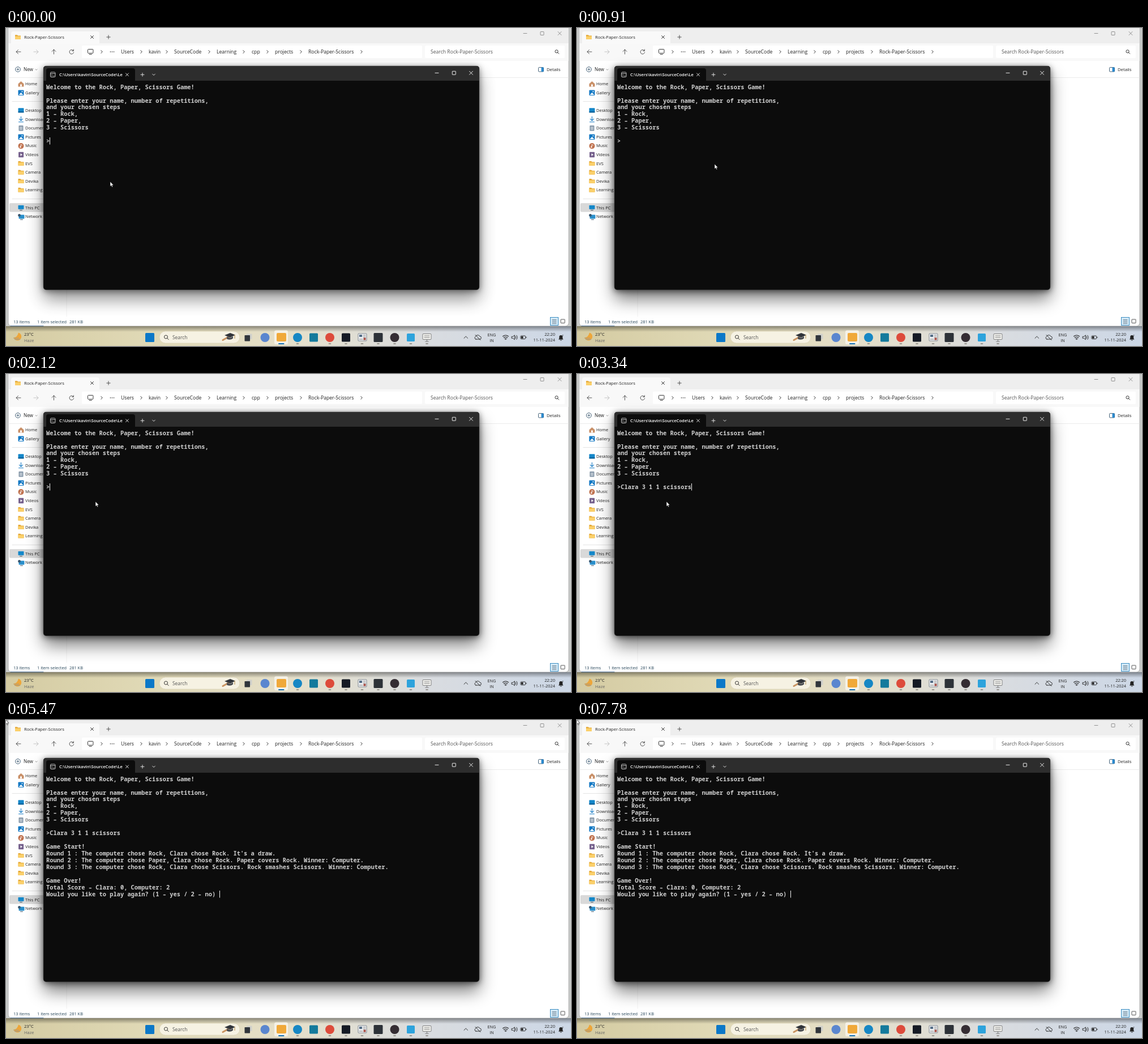
Animation, 998 px wide and 561 px high, one loop 8000 ms. Source, as an HTML page:

```html
<!DOCTYPE html>
<html lang="en">
<head>
<meta charset="utf-8">
<title>Console game</title>
<style>
  html, body { margin: 0; width: 100%; height: 100%; overflow: hidden; background: #c9cbca; }
  svg { display: block; width: 998px; height: 561px; font-family: "Open Sans", "Noto Sans", sans-serif; }
  .console { font: 600 10.4px "Noto Sans Mono", "DejaVu Sans Mono", monospace; fill: #cfcfcf; white-space: pre; }
  .ambient { filter: blur(6px); opacity: .6; }
  .drop { filter: blur(15px); opacity: .5; }
</style>
</head>
<body>
<svg id="stage" viewBox="0 0 998 561" xmlns="http://www.w3.org/2000/svg"></svg>
<script>
const INK = '#222', YELLOW = '#fbd06a', BLUE = '#1479c4';

// Shape helpers; every one returns SVG markup.
const rect = (x, y, w, h, fill, r = 0, extra = '') =>
  `<rect x="${x}" y="${y}" width="${w}" height="${h}" rx="${r}" fill="${fill}" ${extra}/>`;
const frame = (x, y, w, h, color, r = 0, width = .9) =>
  rect(x, y, w, h, 'none', r, `stroke="${color}" stroke-width="${width}"`);
const disc = (x, y, r, fill) => `<circle cx="${x}" cy="${y}" r="${r}" fill="${fill}"/>`;
const ring = (x, y, r, color = INK, width = .9) =>
  `<circle cx="${x}" cy="${y}" r="${r}" fill="none" stroke="${color}" stroke-width="${width}"/>`;
const line = (d, color = INK, width = .9) =>
  `<path d="${d}" fill="none" stroke="${color}" stroke-width="${width}" stroke-linecap="round" stroke-linejoin="round"/>`;
const fill = (d, color) => `<path d="${d}" fill="${color}"/>`;
const text = (x, midY, s, size = 7.5, color = INK, extra = '') =>
  `<text x="${x}" y="${midY + size * .36}" font-size="${size}" fill="${color}" ${extra}>${s}</text>`;

const cross = (x, y, r, color) => line(`M${x - r} ${y - r}l${2 * r} ${2 * r}m0 ${-2 * r}l${-2 * r} ${2 * r}`, color);
const plus = (x, y, r, color) => line(`M${x - r} ${y}h${2 * r}M${x} ${y - r}v${2 * r}`, color);
const chevronRight = (x, y) => line(`M${x - 1.2} ${y - 2.5}l2.5 2.5l-2.5 2.5`);
const chevronDown = (x, y, r, color) => line(`M${x - r} ${y - r / 2}l${r} ${r}l${r} ${-r}`, color);
const magnifier = (x, y, r = 2.6) => ring(x, y, r) + line(`M${x + r * .7} ${y + r * .7}l${r * .9} ${r * .9}`);
const folder = (x, y) =>
  fill(`M${x} ${y + .6}h3.8l1.4 1.3h4.8v6.6h-10z`, '#e3a735') + rect(x, y + 2.9, 10, 5.6, YELLOW, .6);
const screen = (x, y, color) =>
  rect(x, y, 10, 7, color, .8) + line(`M${x + 3} ${y + 8.6}h4`, '#456', 1);
const picture = (x, y) =>
  rect(x, y, 10, 9.6, BLUE, 1) + fill(`M${x + 1} ${y + 8.6}l4-4l4 4z`, '#fff') + disc(x + 7, y + 2.8, 1, '#fff');
const gradient = (id, stops, direction = '') =>
  `<linearGradient id="${id}" ${direction}>${
    stops.map((c, i) => `<stop offset="${i / (stops.length - 1)}" stop-color="${c}"/>`).join('')
  }</linearGradient>`;

function windowButtons(xs, y, color) {
  const [min, max, close] = xs;
  return line(`M${min - 3} ${y}h6`, color) + frame(max - 3, y - 3, 6, 6, color, .5) + cross(close, y, 3, color);
}

function sidebar() {
  const items = [
    ['Home', (x, y) => fill(`M${x} ${y + 4.5}l5-4.5l5 4.5v5h-10z`, '#c99068') + rect(x + 3.6, y + 5.5, 2.8, 4, '#fff')],
    ['Gallery', picture],
    null,
    ['Desktop', (x, y) => rect(x, y + .6, 10, 8, '#1487c9', .8) + rect(x, y + 6.6, 10, 2, '#0b5d95', .6)],
    ['Downloads', (x, y) => line(`M${x + 5} ${y}v7m-3-3l3 3l3-3M${x + 1} ${y + 9.4}h8`, BLUE, 1.1)],
    ['Documents', (x, y) => rect(x + 1, y, 8, 9.6, '#8496a8', .8) + line(`M${x + 3} ${y + 3}h4m-4 2h4m-4 2h4`, '#fff', .8)],
    ['Pictures', picture],
    ['Music', (x, y) => disc(x + 5, y + 5, 5, '#c07350') + line(`M${x + 4.5} ${y + 6.6}v-4l2.5 1`, '#fff', .9) + disc(x + 3.9, y + 6.8, 1.2, '#fff')],
    ['Videos', (x, y) => rect(x + .6, y, 9, 9.6, '#75608c', .8) + fill(`M${x + 4} ${y + 2.6}l3.5 2.2l-3.5 2.2z`, '#fff')],
    ['EVS', folder], ['Camera', folder], ['Devika', folder], ['Learning', folder],
    null,
    ['This PC', (x, y) => screen(x, y + .5, '#1487c9')],
    ['Network', (x, y) => screen(x + 1, y + 1.5, '#2a8fcb') + disc(x + 2, y + 2.5, 2.4, '#37566e')],
  ];
  return rect(6, 309, 62, 15.5, '#d9d9d9', 2) +
    line('M11 129.5H68M11 301.5H68', '#dedede', .8) +
    items.map((item, i) => {
      if (!item) return '';
      const y = 98.5 + 15.6 * i;
      return item[1](21.5, y - 4.6) + text(34, y, item[0]);
    }).join('');
}

function explorer() {
  const crumbs = [[203, 'Users'], [252, 'kavin'], [297, 'SourceCode'], [372, 'Learning'],
    [434, 'cpp'], [475, 'projects'], [534, 'Rock-Paper-Scissors']];
  return rect(4, -8, 990, 534, '#fff', 6, 'stroke="#a0a0a0" stroke-width=".8"') +
    rect(4.4, 0, 989.2, 28, '#eeeeee') + rect(4.4, 27, 989.2, 31, '#f8f8f8') +
    fill('M9 28V10q0-4 4-4H161q4 0 4 4V28z', '#f9f9f9') +
    folder(16, 11.6) + text(32, 16, 'Rock-Paper-Scissors', 7.6) +
    cross(152, 16, 2.5, INK) + plus(181, 16, 3.2, '#444') +
    windowButtons([917, 947, 978], 9.5, '#888') +
    rect(134, 31, 601, 22, '#fff', 2) + rect(740, 31, 247, 22, '#fff', 2) +
    line('M26 42h-8m3.5-3.5l-3.5 3.5l3.5 3.5', '#444') +
    line('M49 42h8m-3.5-3.5l3.5 3.5l-3.5 3.5', '#bbb') +
    line('M84.5 46v-8m-3.5 3.5l3.5-3.5l3.5 3.5', '#444') +
    line('M119 40a3.8 3.8 0 1 0 .6 3M119.3 37.8v2.6h-2.6', '#444') +
    frame(144.5, 37.5, 9.4, 7, INK, 1) + line('M147 46.6h4.4') +
    [184.5, 187.5, 190.5].map(x => disc(x, 42, .8, INK)).join('') +
    [169, 239, 284, 359, 420, 462, 521, 628].map(x => chevronRight(x, 42)).join('') +
    crumbs.map(([x, s]) => text(x, 42, s, 8.65)).join('') +
    text(750, 42, 'Search Rock-Paper-Scissors', 8.65, '#555') + magnifier(972.5, 41.3) +
    ring(21, 73, 4.4, '#34536b') + plus(21, 73, 2, '#34536b') +
    text(31, 73.5, 'New', 8.2) + chevronDown(53.5, 73.5, 1.5, '#888') +
    frame(940.5, 69.5, 9, 7.5, '#34536b', 1) + rect(945.5, 69.5, 4, 7.5, '#2a8ad0', .6) +
    text(955, 73.5, 'Details', 7.7) +
    line('M4.5 87.5H993.5', '#e6e6e6', .8) + line('M107 88V509', '#f0f0f0', .8) +
    sidebar() +
    text(13, 518, '13 items', 7.4, '#27465a') + text(55, 518, '1 item selected', 7.4, '#27465a') +
    text(112, 518, '281 KB', 7.4, '#27465a') +
    rect(961.5, 510.5, 14, 14, '#d5ebf8', 0, 'stroke="#2b84bd" stroke-width=".9"') +
    line('M965 514.5h7m-7 2.3h7m-7 2.3h7m-7 2.3h7', '#456', .7) +
    frame(980, 514, 7, 6.5, '#444', .5);
}

function taskbar() {
  const squares = [[254, 16, '#0b78c8'], [543.5, 15, '#147a9c'], [600.5, 15, '#151a24'],
    [657.5, 16, '#2d3238'], [715, 14, '#2ea3dc']];
  const discs = [[457.5, 8, '#5a86cf'], [515, 8, '#1687c4'], [572, 8, '#dd4b3b'], [686.5, 8, '#352d33']];
  return gradient('bar', ['#d4cba2', '#e0d9b6', '#e5dfc9', '#d9dce0', '#ccd7e6']) +
    gradient('windowShade', ['#0006', '#0000'], 'x1="0" y1="0" x2="0" y2="1"') +
    rect(0, 526, 998, 35, 'url(#bar)') + rect(0, 526, 998, 10, 'url(#windowShade)') +
    line('M8 525.7H66', '#3f668f', 1) +
    fill('M22 537.5a7 7 0 1 1-8.5 8.5q6 .5 8.5-8.5z', '#eda63a') +
    line('M13.5 547h9m-7 2.4h9', '#a89c86', 1.2) +
    text(32, 540.3, '23°C', 7.6) + text(32, 551, 'Haze', 7.5, '#666') +
    rect(271, 535, 142, 21, '#f6f2e3', 10.5, 'stroke="#d8d0b2" stroke-width=".7"') +
    magnifier(282.5, 545, 3) + text(294, 546, 'Search', 8.4, '#555') +
    line('M383 550.5l10-5.5', '#c99361', 3) +
    fill('M386 542l10-4l9 3.5l-9 4.5z', '#30343a') + fill('M390 544.5v4q6 3 11-1v-3.5l-5 2.5z', '#4a4d52') +
    line('M404 541.5v6', '#b18a4a', 1) +
    rect(425, 539.5, 9.5, 9.5, '#d0d0cb', .8) + rect(421.5, 542, 9.5, 10.5, '#30353b', .8) +
    rect(474, 533.5, 24, 24.5, '#f5f1e6', 3) + rect(478, 538, 17, 15, '#f0a93a', 2) +
    rect(481, 556, 10.5, 2, '#1070b8', 1) +
    squares.map(([x, s, c]) => rect(x - s / 2, 546 - s / 2, s, s, c, 1.5)).join('') +
    discs.map(([x, r, c]) => disc(x, 546, r, c)).join('') +
    rect(622, 539, 15, 13, '#eef0f2', 1, 'stroke="#67727c" stroke-width=".8"') +
    rect(624, 541, 5, 4, '#546d86') + line('M631 542h4m-4 3h4m-11 4h6', '#777') +
    rect(631.5, 546.5, 4, 4, '#a54c42') +
    rect(736, 539.5, 15, 10, '#f2f2ee', 1, 'stroke="#777" stroke-width=".9"') +
    line('M739 543h9m-9 3h9M743.5 550v3m-3 0h6', '#777') +
    [515, 572, 600.5, 629, 657.5, 686.5, 715, 743.5].map(x => rect(x - 2.3, 556.2, 4.6, 1.6, '#817e75', .8)).join('') +
    line('M809 547.3l3.3-3.3l3.3 3.3') +
    line('M830 549h7a2.4 2.4 0 0 0 0-4.8a4 4 0 0 0-7.5 .2a2.4 2.4 0 0 0 .5 4.6zM829 541.5l9 9') +
    text(858, 541, 'ENG', 7.3, INK, 'text-anchor="middle"') + text(858, 551, 'IN', 7.3, INK, 'text-anchor="middle"') +
    line('M877.5 544q5-4 10 0M879.3 546.2q3.2-2.5 6.4 0M881 548.3q1.5-1 3 0', INK, 1.1) + disc(882.5, 549.3, .8, INK) +
    line('M893.5 544.3h2l2.8-2.5v8l-2.8-2.5h-2zM900 543.8q1.4 2 0 4M901.8 542.2q2.8 3.6 0 7.2') +
    frame(909, 543, 8.5, 5.6, INK, 1.3) + rect(910, 544, 3.5, 3.6, INK) + line('M919 545v1.6') +
    text(970, 540.3, '22:20', 7.4, INK, 'text-anchor="end"') + text(970, 550.8, '11-11-2024', 7.4, INK, 'text-anchor="end"') +
    fill('M976 549.5l1.2-2v-2.4a3 3 0 0 1 6 0v2.4l1.2 2z', INK) + line('M979 550.8h2.4') +
    text(982.2, 542.5, 'z', 5);
}

function consoleWindow() {
  return '<g id="shadow">' +
    rect(66, 84, 770, 395, '#000', 5, 'class="drop"') + rect(66, 69, 770, 395, '#000', 5, 'class="ambient"') +
    '</g>' +
    rect(66, 67, 770, 395, '#0c0c0c', 5) +
    fill('M66 93V72q0-5 5-5H831q5 0 5 5V93z', '#2d2d2d') +
    fill('M71 93V75q0-4 4-4H224q4 0 4 4V93z', '#0c0c0c') +
    frame(66.2, 67.2, 769.6, 394.6, '#3c3c3c', 5, .6) +
    frame(78.5, 78, 8.5, 8.5, '#ddd', 1.5) + line('M79 80.5h7.5', '#ddd', .8) + line('M80.5 82.5l1.5 1l-1.5 1m3 0h2', '#ddd', .7) +
    text(94, 82.3, 'C:\\Users\\kavin\\SourceCode\\Le', 7.65, '#fff', 'font-weight="600"') +
    cross(214, 82.3, 2.5, '#eee') + plus(241, 82.3, 3, '#eee') + chevronDown(261, 82.3, 2.3, '#eee') +
    windowButtons([761, 791.3, 821.5], 79.3, '#fff');
}

const CELL = 6.24, LEFT = 71, FIRST_BASELINE = 107.6, LEADING = 11.96;
const INTRO = ['Welcome to the Rock, Paper, Scissors Game!', '',
  'Please enter your name, number of repetitions,', 'and your chosen steps',
  '1 – Rock,', '2 – Paper,', '3 – Scissors', ''];
const PROMPT = '>', ENTRY = '>Clara 3 1 1 scissors';
const RESULT = ['', 'Game Start!',
  "Round 1 : The computer chose Rock, Clara chose Rock. It's a draw.",
  'Round 2 : The computer chose Paper, Clara chose Rock. Paper covers Rock. Winner: Computer.',
  'Round 3 : The computer chose Rock, Clara chose Scissors. Rock smashes Scissors. Winner: Computer.',
  '', 'Game Over!', 'Total Score – Clara: 0, Computer: 2',
  'Would you like to play again? (1 – yes / 2 – no) '];

const consoleLines = (lines, first) => lines.map((s, i) =>
  s && `<text class="console" x="${LEFT}" y="${FIRST_BASELINE + (first + i) * LEADING}">${s}</text>`).join('');

const stage = document.getElementById('stage');
stage.innerHTML = rect(0, 0, 998, 561, '#c9cbca') + explorer() + taskbar() + consoleWindow() +
  consoleLines(INTRO, 0) +
  `<g id="prompt">${consoleLines([PROMPT], 8)}</g>` +
  `<g id="entry">${consoleLines([ENTRY], 8)}</g>` +
  `<g id="result">${consoleLines(RESULT, 9)}</g>` +
  rect(0, 0, 1, 12.5, '#f2f2f2', 0, 'id="caret"') +
  '<path id="pointer" d="M0 0V8.6L2 6.8L3.3 9.7L4.7 9.1L3.4 6.3H6z" fill="#fff" stroke="#111" stroke-width=".6"/>';

const LOOP = 8000, FOCUSED = 200, ENTERED = 3340, ANSWERED = 5470;
const CARET_TOGGLES = [500, 1010, 1610, 2120, 4140, 4670, 5270, 5470, 6070, 6670, 7170, 7780];
const POINTER_STEPS = [[0, 184, 271], [500, 202, 267], [600, 230, 260], [700, 244, 253], [800, 246, 247],
  [900, 243, 240], [1010, 235, 233], [1110, 221, 227], [1210, 203, 224], [1310, 174, 224],
  [1410, 158, 225], [1610, 160, 223], [1720, 158, 225], [ANSWERED, -1, -1]];

const byId = id => document.getElementById(id);
const show = (id, visible) => byId(id).setAttribute('visibility', visible ? 'visible' : 'hidden');
const move = (id, x, y) => byId(id).setAttribute('transform', `translate(${x} ${y})`);

function render(t) {
  const entered = t >= ENTERED, answered = t >= ANSWERED;
  byId('shadow').setAttribute('opacity', t < FOCUSED ? .85 : 1);
  show('prompt', !entered);
  show('entry', entered);
  show('result', answered);

  const activeLine = answered ? RESULT.at(-1) : entered ? ENTRY : PROMPT;
  const row = answered ? 17 : 8;
  move('caret', Math.round(LEFT + activeLine.length * CELL), Math.round(FIRST_BASELINE + row * LEADING - 9.8));
  show('caret', CARET_TOGGLES.filter(time => time <= t).length % 2 === 0);

  const [, x, y] = POINTER_STEPS.findLast(([time]) => time <= t);
  move('pointer', x, y);
}

const start = performance.now();
function tick() {
  render((performance.now() - start) % LOOP);
  requestAnimationFrame(tick);
}
tick();
</script>
</body>
</html>
```
